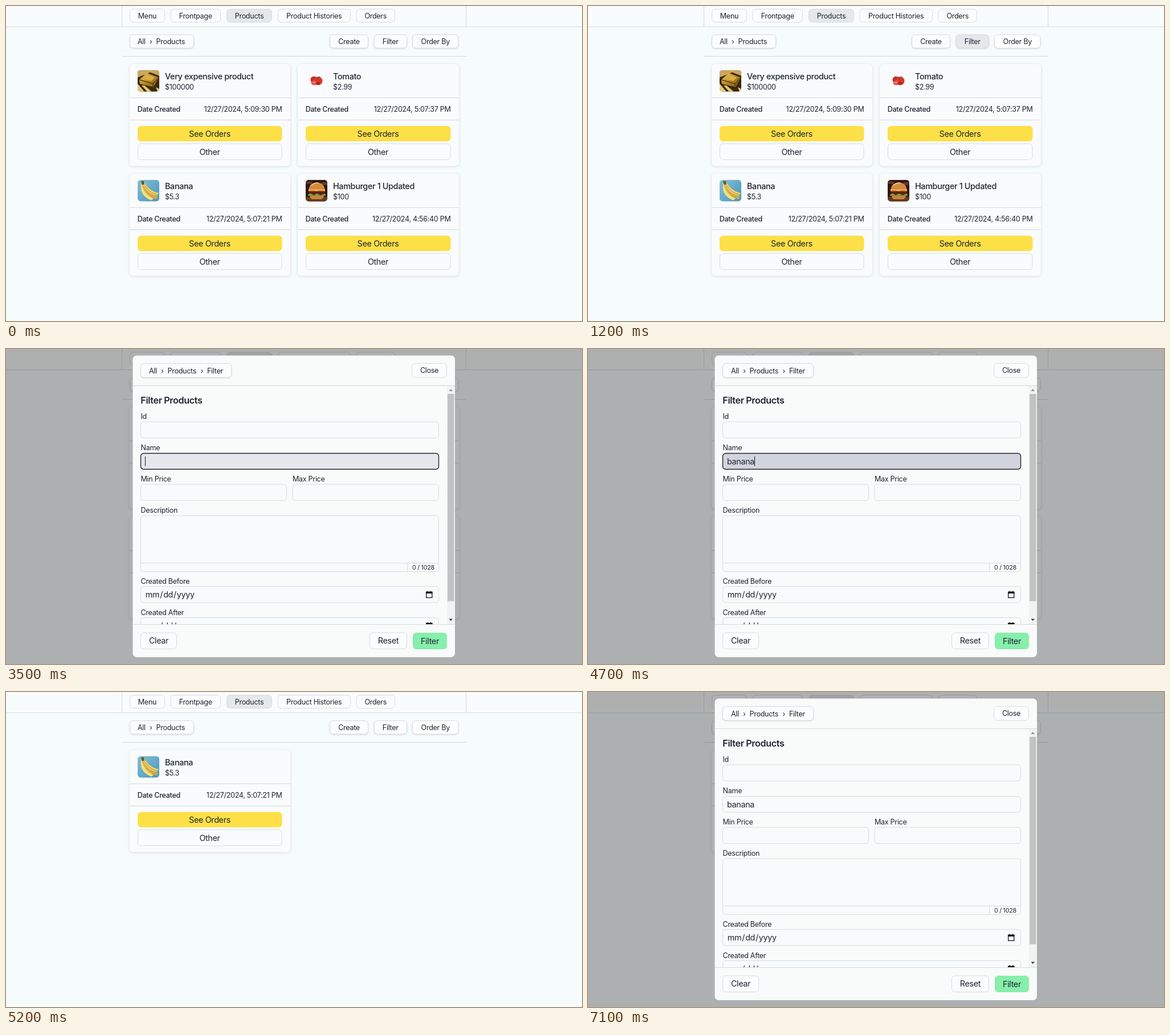
An HTML page for the animation above (8000 ms loop, 1011x554 px).

```html
<!DOCTYPE html>
<html lang="en">
<head>
<meta charset="utf-8">
<title>Product filter</title>
<style>
  html, body { margin: 0; width: 100%; height: 100%; overflow: hidden; background: #f6fbfb; }
  svg { display: block; width: 1011px; height: 554px; }
  text { font-family: Inter, "Liberation Sans", sans-serif; letter-spacing: -.025em; fill: #1f2530; white-space: pre; }
  .btn { fill: #fafcfd; stroke: #d8dcdf; }
  .raised { filter: drop-shadow(0 1px 1px rgba(0, 0, 0, .13)); }
  .card { fill: #f9fbfd; filter: drop-shadow(0 1px 2.5px rgba(0, 0, 0, .13)); }
  .line { stroke: #d6dadd; fill: none; }
  .field { fill: #f8fbfc; stroke: #d8dcdf; }
</style>
</head>
<body>
<svg id="stage" viewBox="0 0 1011 554">
  <defs>
    <clipPath id="thumb"><rect width="38" height="38" rx="5.5"/></clipPath>
    <clipPath id="scroll"><rect x="223" y="65" width="551" height="419"/></clipPath>
    <linearGradient id="gold" x2="1" y2="1">
      <stop stop-color="#f0cf6a"/><stop offset=".5" stop-color="#b98a26"/><stop offset="1" stop-color="#74500f"/>
    </linearGradient>
    <linearGradient id="sky" x2="1" y2="1">
      <stop stop-color="#86bfd6"/><stop offset="1" stop-color="#4796bd"/>
    </linearGradient>
  </defs>
</svg>
<script>
const LOOP = 8000;
const SMALL = 12.6, BASE = 14.4;
const stage = document.getElementById('stage');

function add(parent, tag, attrs = {}) {
  const node = document.createElementNS('http://www.w3.org/2000/svg', tag);
  for (const key in attrs) node.setAttribute(key, attrs[key]);
  return parent.appendChild(node);
}

const group = (parent, attrs) => add(parent, 'g', attrs);
const path = (parent, d, attrs) => add(parent, 'path', { d, ...attrs });

function box(parent, left, top, right, bottom, attrs) {
  return add(parent, 'rect', { x: left, y: top, width: right - left, height: bottom - top, rx: 6, ...attrs });
}

// Places text by the middle of its line.
function label(parent, str, x, middle, size = SMALL, attrs = {}) {
  const node = add(parent, 'text', { x, y: Math.round(middle + size * .364), 'font-size': size, ...attrs });
  node.textContent = str;
  return node;
}

function button(parent, str, left, right, top, bottom, size = SMALL, attrs = {}) {
  const rect = box(parent, left, top, right, bottom, { class: 'btn', ...attrs });
  label(parent, str, (left + right) / 2, (top + bottom) / 2, size, { 'text-anchor': 'middle' });
  return rect;
}

const pictures = {
  gold(g) {
    add(g, 'rect', { width: 38, height: 38, fill: '#3a2911' });
    path(g, 'M0 0H38V10L22 4 0 13Z', { fill: '#caa75a' });
    path(g, 'M0 24 12 38H0ZM12 27 25 38H17L7 27ZM32 30 38 33V38H35Z', { fill: '#e6c877' });
    path(g, 'M3 17 16 5 37 13 28 30 4 24Z', { fill: 'url(#gold)' });
    path(g, 'M3 17 27 24 37 13M27 24V30', { fill: 'none', stroke: '#5b400d', 'stroke-width': 1.5 });
    path(g, 'M9 15 18 8 30 13 24 19Z', { fill: '#d9ad43' });
  },
  tomato(g) {
    add(g, 'circle', { cx: 14.5, cy: 17, r: 6, fill: '#c92e25' });
    add(g, 'circle', { cx: 22, cy: 19, r: 7.5, fill: '#d9372b' });
    add(g, 'ellipse', { cx: 15, cy: 22.5, rx: 5.5, ry: 4, fill: '#e5574a' });
    add(g, 'ellipse', { cx: 21, cy: 23, rx: 4, ry: 2.5, fill: '#b5211c' });
    path(g, 'M17 12 21 14 25 11M21 14V17', { fill: 'none', stroke: '#59552c' });
    path(g, 'M12 22Q15 20 18 23', { fill: 'none', stroke: '#f5b09c' });
  },
  banana(g) {
    add(g, 'rect', { width: 38, height: 38, fill: 'url(#sky)' });
    path(g, 'M8 5C8 20 17 31 33 34L36 30C23 26 15 17 11 4Z', { fill: '#d7a93a' });
    path(g, 'M9 6C14 19 22 26 34 28L37 23C25 21 17 14 12 4Z', { fill: '#f2d36b' });
    path(g, 'M7 6C3 18 9 31 24 36L29 32C16 26 11 18 10 6Z', { fill: '#f5dd82' });
    path(g, 'M6 2H11L12 8 8 9Z', { fill: '#665b23' });
    path(g, 'M9 9C11 21 19 29 30 33M12 9C17 18 25 24 35 26', { fill: 'none', stroke: '#9c7726', 'stroke-width': .8 });
  },
  burger(g) {
    add(g, 'rect', { width: 38, height: 38, fill: '#2c1714' });
    path(g, 'M0 30H38V38H0Z', { fill: '#673a20' });
    path(g, 'M0 3H11V7H0ZM27 4H38V9H29Z', { fill: '#65382b' });
    path(g, 'M6 16C6 1 33 1 33 16Z', { fill: '#d68a3d' });
    path(g, 'M10 10Q16 4 23 6', { fill: 'none', stroke: '#f1bd76', 'stroke-width': 2 });
    path(g, 'M5 16H34V21L26 19 20 23 14 19 5 21Z', { fill: '#e5b450' });
    path(g, 'M5 20H34V26H5Z', { fill: '#592316' });
    path(g, 'M7 19H16V21H7ZM22 19H31V21H22Z', { fill: '#bd3625' });
    path(g, 'M4 26 9 24 14 27 20 24 26 27 34 24 35 28H4Z', { fill: '#83a43b' });
    path(g, 'M7 28H32Q31 34 26 34H12Q8 34 7 28Z', { fill: '#c98440' });
  }
};

function card(parent, x, y, width, picture, name, price, date) {
  const right = x + width, inner = right - 14.5, mid = x + width / 2 - .5;
  const g = group(parent);
  box(g, x, y, right, y + 179.5, { class: 'card' });
  const photo = group(group(g, { transform: `translate(${x + 14} ${y + 10.7})` }), { 'clip-path': 'url(#thumb)' });
  pictures[picture](photo);
  label(g, name, x + 62, y + 21.3, BASE, { 'font-weight': 500 });
  label(g, price, x + 62, y + 40, SMALL, { fill: '#3b414c' });
  path(g, `M${x} ${y + 59.5}H${right}M${x} ${y + 98.5}H${right}`, { class: 'line' });
  label(g, 'Date Created', x + 13.7, y + 79, SMALL, { 'font-weight': 500 });
  label(g, date, inner, y + 79, SMALL, { 'text-anchor': 'end', fill: '#4b515c' });
  box(g, x + 14, y + 109, inner, y + 136, { fill: '#fde047' });
  label(g, 'See Orders', mid, y + 122.5, BASE, { 'text-anchor': 'middle' });
  box(g, x + 14.5, y + 140, inner - .5, y + 168.5, { class: 'btn', style: 'fill:#f9fcfd' });
  label(g, 'Other', mid, y + 154.4, BASE, { 'text-anchor': 'middle' });
}

// Page
const page = group(stage);
add(page, 'rect', { width: 1011, height: 554, fill: '#f6fbfb' });
add(page, 'rect', { width: 1011, height: 36, fill: '#f9fcfc' });
path(page, 'M0 36.5H1011M203.5 0V36M807.5 0V36M204 88.5H808', { class: 'line' });
[['Menu', 217.5, 278.5], ['Frontpage', 289, 376.5], ['Products', 387.5, 466.5],
 ['Product Histories', 477, 604.5], ['Orders', 615, 682.5]].forEach(([str, left, right]) =>
  button(page, str, left, right, 5.5, 28.5, SMALL, str === 'Products' ? { style: 'fill:#e5e8ea' } : {}));

box(page, 217.5, 50.5, 329.5, 74, { class: 'btn raised' });
[['All', 231], ['›', 252], ['Products', 263.5]].forEach(([str, x]) => label(page, str, x, 62));
const tool = (str, left, right) => button(page, str, left, right, 50.5, 74, SMALL, { class: 'btn raised' });
tool('Create', 568.5, 635.5);
const filterBtn = tool('Filter', 646, 703.5);
const orderBtn = tool('Order By', 713.5, 794);

const banana = ['banana', 'Banana', '$5.3', '12/27/2024, 5:07:21 PM'];
const all = group(page), found = group(page);
card(all, 217, 102, 282, 'gold', 'Very expensive product', '$100000', '12/27/2024, 5:09:30 PM');
card(all, 512, 102, 283, 'tomato', 'Tomato', '$2.99', '12/27/2024, 5:07:37 PM');
card(all, 217, 295, 282, ...banana);
card(all, 512, 295, 283, 'burger', 'Hamburger 1 Updated', '$100', '12/27/2024, 4:56:40 PM');
card(found, 217, 102, 282, ...banana);

// Dialog
const dialog = group(stage);
add(dialog, 'rect', { width: 1011, height: 554, fill: '#000', opacity: .3 });
box(dialog, 222.5, 11.5, 788, 542, { rx: 7, fill: '#f9fafa' });
box(dialog, 236.5, 25.5, 395.5, 50, { class: 'btn raised' });
[['All', 251], ['›', 272], ['Products', 283.5], ['›', 341.5], ['Filter', 353]]
  .forEach(([str, x]) => label(dialog, str, x, 38));
button(dialog, 'Close', 712.5, 773.5, 25.5, 50);

const form = group(dialog, { 'clip-path': 'url(#scroll)' });
const field = (left, top, right = 759.5, bottom = top + 28.5) =>
  box(form, left, top, right, bottom, { rx: 5, class: 'field' });
label(form, 'Filter Products', 236.3, 90.5, 16.2, { 'font-weight': 600 });
[['Id', 236.5, 118.5], ['Name', 236.5, 173.5], ['Min Price', 236.5, 228.5], ['Max Price', 503, 228.5],
 ['Description', 236.5, 283], ['Created Before', 236.5, 408], ['Created After', 236.5, 463]]
  .forEach(([str, x, y]) => label(form, str, x, y));
field(236.5, 128);
const nameField = field(236.5, 183.5, 759.5, 211.5);
field(236.5, 238, 492.5);
field(503, 238);
field(236.5, 293, 759.5, 391.5);
path(form, 'M237 376.5H759M704.5 377V391', { class: 'line' });
label(form, '0 / 1028', 752, 384, 10.8, { 'text-anchor': 'end' });
for (const y of [417.5, 472.5]) {
  field(236.5, y);
  label(form, 'mm/dd/yyyy', 244.8, y + 14.5, BASE, { dx: '0 0 1 1 0 1 1 0 0 0', fill: '#30353e' });
  path(form, `M737.7 ${y + 10}H747.8V${y + 19.8}H737.7ZM740 ${y + 8}V${y + 10}M745.5 ${y + 8}V${y + 10}`,
    { fill: 'none', stroke: '#111', 'stroke-width': 1.3 });
  path(form, `M737 ${y + 9.3}H748.5V${y + 12.5}H737Z`, { fill: '#111' });
}
const typed = label(form, '', 244, 197.7, BASE);
const caret = add(form, 'rect', { y: 189, width: 1, height: 17, fill: '#111' });

// Scrollbar and footer
add(dialog, 'rect', { x: 774, y: 65, width: 13.5, height: 419, fill: '#f1f2f2' });
add(dialog, 'rect', { x: 775, y: 79, width: 11.5, height: 364.5, fill: '#c1c2c2' });
path(dialog, 'M777.5 74H784L780.7 70.3Z', { fill: '#8b8d8d' });
path(dialog, 'M777.5 474.5H784L780.7 478.2Z', { fill: '#404242' });
path(dialog, 'M223 64.5H788M223 484.5H788', { class: 'line' });
button(dialog, 'Clear', 236.5, 299.5, 499, 527.5, BASE);
button(dialog, 'Reset', 638.5, 703.5, 499, 527.5, BASE);
button(dialog, 'Filter', 714, 774, 499, 528, BASE, { style: 'fill:#86efac;stroke:none' });

// Steps: [from ms, value]
const PLAIN = '#fafcfd', HALF = '#f0f2f4', HOVER = '#e5e7eb';
const steps = {
  order: [[0, PLAIN], [900, HALF], [1000, HOVER], [1100, HALF], [1200, '#ffffff']],
  filter: [[0, PLAIN], [1100, HALF], [1200, HOVER], [5000, PLAIN], [6800, HOVER]],
  open: [[0, false], [2000, true], [5000, false], [7100, true]],
  found: [[0, false], [5200, true]],
  focus: [[0, 0], [3500, .5], [3600, 1], [5000, 0]],
  caret: [[0, false], [3500, true], [4000, false], [4200, true], [5000, false]]
};
const at = (key, t) => steps[key].filter(([from]) => from <= t).pop()[1];
const show = (node, on) => { node.style.visibility = on ? 'inherit' : 'hidden'; };

function draw(t) {
  orderBtn.style.fill = at('order', t);
  filterBtn.style.fill = at('filter', t);
  show(all, !at('found', t));
  show(found, at('found', t));
  show(dialog, at('open', t));

  const focus = at('focus', t);
  nameField.style.fill = ['#f8fbfc', '#e5e7ed', '#d2d4dd'][focus * 2];
  nameField.style.stroke = focus ? '#20232c' : '';
  nameField.style.strokeWidth = focus ? 1.4 : 1;

  const count = Math.max(0, Math.min(6, Math.floor((t - 4100) / 100)));
  typed.textContent = 'banana'.slice(0, count);
  caret.setAttribute('x', Math.round(244 + (count ? typed.getComputedTextLength() : 0)));
  show(caret, at('caret', t));
}

const start = performance.now();
function frame() {
  draw((performance.now() - start) % LOOP);
  requestAnimationFrame(frame);
}
frame();
</script>
</body>
</html>
```
